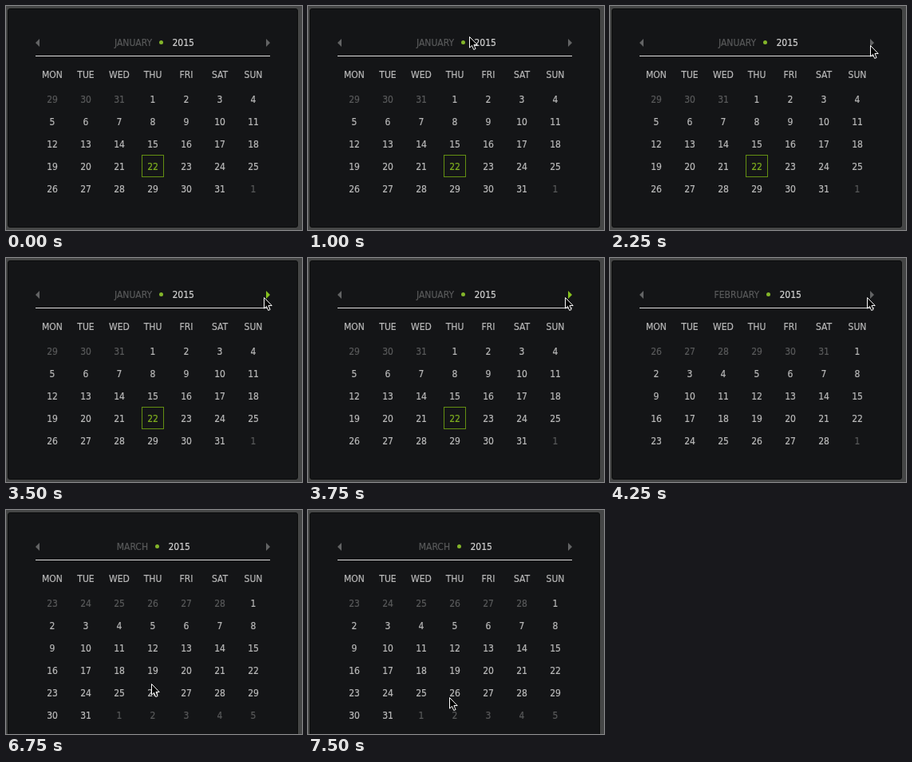
These frames come from a looping animation (371x280 px, 8 s). An HTML page:

```html
<!DOCTYPE html>
<html lang="en">
<head>
<meta charset="utf-8">
<title>Calendar</title>
<style>
  html, body { margin: 0; width: 100%; height: 100%; overflow: hidden; background: #454646; }
  #stage {
    position: relative; width: 371px; height: 280px; overflow: hidden;
    font: 12px/16px "DejaVu Sans Condensed", "Noto Sans", sans-serif;
    color: #b9b9b9; -webkit-text-stroke: .2px;
  }
  #stage *, #stage { --loop: 8s step-end infinite; }
  .panel {
    position: absolute; left: 2px; top: 3px; width: 364px; height: 274px;
    box-sizing: border-box; border: 1px solid #0b0c0c; border-radius: 3px;
    background: #141517; animation: grow var(--loop);
  }
  .rule { position: absolute; left: 37px; top: 62px; width: 294px; height: 1px; background: #dcdcdc; }
  .month { position: absolute; inset: 0; visibility: hidden; }
  .month.jan { animation: jan var(--loop); }
  .month.feb { animation: feb var(--loop); }
  .month.mar { animation: mar var(--loop); }
  .cell { position: absolute; width: 42px; text-align: center; }
  .dim, .name { color: #58595a; }
  .today { color: #7fae1e; }
  .today::before {
    content: ""; position: absolute; left: 7px; top: -7px; width: 26px; height: 26px;
    border: 1px solid #648f12;
  }
  .name, .year, .dot { position: absolute; top: 38px; }
  .name { right: calc(371px - var(--x) + 11.5px); }
  .year { left: calc(var(--x) + 14px); color: #cfcfcf; }
  .dot {
    left: calc(var(--x) - 2.5px); top: 43px; width: 5px; height: 5px;
    border-radius: 50%; background: #83b52a;
  }
  svg { position: absolute; left: 0; top: 0; overflow: visible; }
  .arrow { fill: #636465; }
  .next { animation: glow var(--loop); }
  .cursor { fill: #000; stroke: #fff; visibility: hidden; animation: move var(--loop); }

  @keyframes jan { 0% { visibility: visible } 53.125%, 100% { visibility: hidden } }
  @keyframes feb { 0% { visibility: hidden } 53.125% { visibility: visible } 71.875%, 100% { visibility: hidden } }
  @keyframes mar { 0% { visibility: hidden } 71.875%, 100% { visibility: visible } }
  @keyframes grow { 0% { height: 274px } 71.875%, 100% { height: 302px } }
  @keyframes glow {
    0%, 53.125%, 81.25%, 100% { fill: #636465 }
    43.75%, 78.125% { fill: #86c11f }
  }
  @keyframes move {
    0% { visibility: hidden; transform: translate(186px, 182px) }
    6.25% { visibility: visible; transform: translate(186px, 182px) }
    9.375% { visibility: visible; transform: translate(185px, 137px) }
    12.5% { visibility: visible; transform: translate(202px, 38px) }
    15.625% { visibility: visible; transform: translate(279px, 39px) }
    18.75% { visibility: visible; transform: translate(289px, 109px) }
    21.875% { visibility: visible; transform: translate(326px, 49px) }
    25% { visibility: visible; transform: translate(327px, 47px) }
    28.125% { visibility: visible; transform: translate(326px, 49px) }
    43.75% { visibility: visible; transform: translate(323px, 49px) }
    46.875% { visibility: visible; transform: translate(322px, 49px) }
    78.125% { visibility: visible; transform: translate(316px, 52px) }
    81.25% { visibility: visible; transform: translate(205px, 132px) }
    84.375% { visibility: visible; transform: translate(182px, 217px) }
    87.5%, 100% { visibility: visible; transform: translate(177px, 234px) }
  }
</style>
</head>
<body>
<div id="stage">
  <div class="panel"></div>
  <div class="rule"></div>
  <svg width="371" height="280">
    <path class="arrow" d="M37 46l5-5v10z"/>
    <path class="arrow next" d="M331 46l-5-5v10z"/>
  </svg>
</div>
<script>
  const stage = document.getElementById('stage');

  function add(parent, cls, text = '') {
    const el = document.createElement('div');
    el.className = cls;
    el.textContent = text;
    parent.append(el);
    return el;
  }

  function cell(parent, col, y, text, cls = '') {
    const el = add(parent, 'cell ' + cls, text);
    el.style.left = 37 + col * 42 + 'px';
    el.style.top = y - 8 + 'px';
  }

  // lead: days shown from the previous month, which has prev days
  function month({ cls, name, dotX, lead, prev, days, today }) {
    const box = add(stage, 'month ' + cls);
    box.style.setProperty('--x', dotX + 'px');
    add(box, 'name', name);
    add(box, 'dot');
    add(box, 'year', '2015');
    const count = Math.ceil((lead + days) / 7) * 7;
    for (let i = 0; i < count; i++) {
      const d = i - lead + 1;
      const inside = d > 0 && d <= days;
      const label = d < 1 ? prev + d : inside ? d : d - days;
      cell(box, i % 7, 117 + Math.floor(i / 7) * 28, label,
        !inside ? 'dim' : d === today ? 'today' : '');
    }
  }

  ['MON', 'TUE', 'WED', 'THU', 'FRI', 'SAT', 'SUN'].forEach((d, i) => cell(stage, i, 86, d));
  month({ cls: 'jan', name: 'JANUARY', dotX: 194.5, lead: 3, prev: 31, days: 31, today: 22 });
  month({ cls: 'feb', name: 'FEBRUARY', dotX: 198.5, lead: 6, prev: 31, days: 28 });
  month({ cls: 'mar', name: 'MARCH', dotX: 189.5, lead: 6, prev: 28, days: 31 });

  stage.insertAdjacentHTML('beforeend',
    '<svg class="cursor" width="12" height="18">' +
    '<path d="M.5 .5v13.6l3-2.8 2.2 5.2 2.4-1-2.2-5h4.3z"/></svg>');
</script>
</body>
</html>
```
